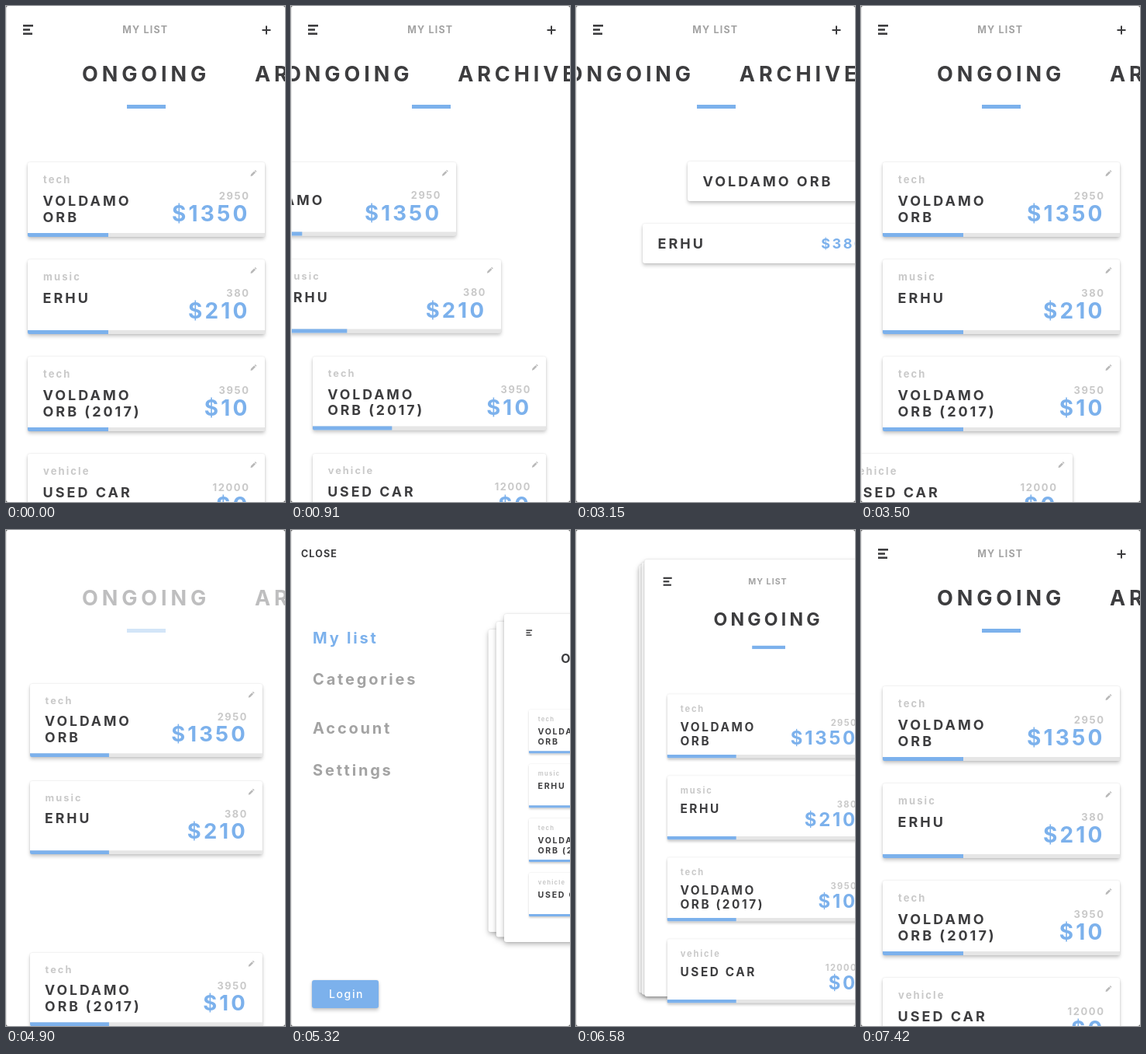
An HTML page for the animation above (7.77 s loop, 360 by 638 pixels).

```html
<!DOCTYPE html>
<html lang="en">
<head>
<meta charset="utf-8">
<title>Savings list</title>
<style>
html, body { margin: 0; width: 100%; height: 100%; overflow: hidden; background: #fff; }
svg { display: block; width: 360px; height: 638px; }
text { font-family: Inter, "Open Sans", sans-serif; white-space: pre; }
.card { fill: #fff; filter: drop-shadow(0 0 1px rgba(0,0,0,.12)) drop-shadow(0 3px 2px rgba(0,0,0,.2)); }
.sheet { fill: #fff; filter: drop-shadow(0 0 1px rgba(0,0,0,.12)) drop-shadow(0 3px 3px rgba(0,0,0,.25)); }
</style>
</head>
<body>
<svg id="stage" viewBox="0 0 360 638"></svg>
<script>
const LOOP = 7770, STEP = 70;
const BLUE = '#7cb1ec', DARK = '#3d3d3f', GREY = '#a3a3a3', PALE = '#c9c9c9';
const stage = document.getElementById('stage');

function el(parent, tag, attrs = {}) {
  const node = document.createElementNS('http://www.w3.org/2000/svg', tag);
  set(node, attrs);
  return parent.appendChild(node);
}

function set(node, attrs) {
  for (const key in attrs) node.setAttribute(key, attrs[key]);
}

function rect(parent, x, y, width, height, fill, rx = 0) {
  return el(parent, 'rect', { x, y, width, height, fill, rx });
}

function label(parent, str, x, y, size, fill, spacing, right = false, weight = 700) {
  const node = el(parent, 'text', {
    x: right ? x + spacing : x, y, fill,
    'font-size': size, 'font-weight': weight, 'letter-spacing': spacing,
    'text-anchor': right ? 'end' : 'start'
  });
  node.textContent = str;
  return node;
}

function cardBase(parent, height) {
  const g = el(parent, 'g');
  el(g, 'rect', { class: 'card', width: 306, height, rx: 3 });
  return g;
}

function goalCard(parent, [kind, lines, total, left]) {
  const g = cardBase(parent, 96);
  el(g, 'path', { d: 'M0 91H306V94Q306 96 304 96H2Q0 96 0 94Z', fill: '#e6e6e6' });
  el(g, 'path', { d: 'M0 91H104V96H2Q0 96 0 94Z', fill: BLUE });
  label(g, kind, 20, 26.5, 13, PALE, 2.1);
  lines.forEach((line, i) => label(g, line, 19.5, 55.5 + 21 * i, 18, DARK, 3));
  label(g, total, 285, 47.5, 13, PALE, 1.6, true);
  label(g, left, 283.5, 76, 28, BLUE, 3.2, true);
  el(g, 'path', {
    d: 'M287.5 18l.6-2.4 4.1-4.1 1.8 1.8-4.1 4.1zM292.8 10.9l.9-.9 1.8 1.8-.9.9z',
    fill: '#b8b8b8'
  });
  return g;
}

function doneCard(parent, [name, price]) {
  const g = cardBase(parent, 51);
  label(g, name, 19.5, 32, 18, DARK, 3);
  label(g, price, 285, 32, 18, BLUE, 2.5, true);
  return g;
}

// Menu, behind the page
rect(stage, 0, 0, 360, 638, '#fff');
const menu = el(stage, 'g');
[['My list', 146, BLUE], ['Categories', 199, GREY], ['Account', 262, GREY], ['Settings', 316, GREY]]
  .forEach(([str, y, fill]) => label(menu, str, 46, y, 20, fill, 2.8));
const login = rect(menu, 45, 579, 86, 36, BLUE, 3);
login.setAttribute('class', 'card');
login.style.fill = BLUE;
label(menu, 'Login', 67, 602, 14, '#fff', 1.6, false, 500);
const close = label(stage, 'CLOSE', 22, 34.5, 12.5, DARK, 1.1);

// Page and the sheets under it
const sheets = [2, 1, 0].map(depth => ({ depth, node: el(stage, 'rect', { class: 'sheet', rx: 3 }) }));
const page = el(stage, 'g');
const head = el(page, 'g');
rect(head, 22, 24, 13, 2.6, DARK);
rect(head, 22, 29.2, 9, 2.6, DARK);
rect(head, 22, 34.4, 12, 2.6, DARK);
rect(head, 330.5, 30, 11, 2, DARK);
rect(head, 335, 25.5, 2, 11, DARK);
label(head, 'MY LIST', 150.2, 34.5, 12.5, GREY, 1.2);

const tabs = el(page, 'g');
const names = el(tabs, 'g');
label(names, 'ONGOING', 98, 97, 27, DARK, 4.9);
label(names, 'ARCHIVE', 321, 97, 27, DARK, 4.9);
rect(tabs, 156, 127, 50, 5, BLUE);

const goals = [
  ['tech', ['VOLDAMO', 'ORB'], '2950', '$1350'],
  ['music', ['ERHU'], '380', '$210'],
  ['tech', ['VOLDAMO', 'ORB (2017)'], '3950', '$10'],
  ['vehicle', ['USED CAR'], '12000', '$0']
].map(data => goalCard(page, data));
const done = [['VOLDAMO ORB', '$2950'], ['ERHU', '$380']].map(data => doneCard(page, data));

// Device edge
rect(stage, 0, 0, 1, 638, '#e4e4e4');
el(stage, 'path', {
  d: 'M0 0H360V638H0ZM3 0Q0 0 0 3V635Q0 638 3 638H357Q360 638 360 635V3Q360 0 357 0Z',
  'fill-rule': 'evenodd', fill: '#555'
});

const clamp = (x, lo = 0, hi = 1) => Math.min(hi, Math.max(lo, x));
const smooth = x => x * x * (3 - 2 * x);
const easeOut = x => 1 - (1 - x) ** 2;
const place = (node, x, y, s = 1) => node.setAttribute('transform', `translate(${x} ${y}) scale(${s})`);
const show = (node, on) => { node.style.display = on ? '' : 'none'; };

function pose(t) {
  const since = ms => Math.floor(t / STEP) - ms / STEP;
  const p = {
    tab: 0, head: 1, tabs: 1, mini: 0, slide: 0, menu: -400, close: -200,
    goals: goals.map((_, i) => ({ x: 28, y: 201 + 125 * i, s: 1 })),
    done: done.map(() => 400)
  };
  if (t >= 910 && t < 3150) {                    // swipe to archive
    const n = since(840);
    p.tab = n > 10 ? 216 : 216 * (1 - .51 ** n);
    p.goals.forEach((c, i) => {
      c.x -= 116 * Math.max(0, n - i / 2);
      c.s = Math.max(.94, 1 - .016 * n);
    });
    p.done = done.map((_, i) => 400 * (1 - easeOut(clamp((n - 3 - i) / 8))));
  } else if (t >= 3150 && t < 4900) {            // swipe back
    const n = since(3080);
    p.tab = n > 5 ? 0 : 216 * .51 ** n;
    p.goals.forEach((c, i) => { c.x += Math.min(0, 116 * (n - 6) - 61 * (i - 2)); });
    p.done = done.map((_, i) => 116 * Math.max(0, n - i / 2));
  } else if (t >= 4900 && t < 6230) {            // open the menu
    const n = since(4830);
    p.menu = -220 * (1 - easeOut(clamp((n - 2) / 7)));
    p.close = p.menu / 2;
    if (n < 5) {
      p.head = 0;
      p.tabs = n > 1 ? 0 : .33;
      p.goals.forEach((c, i) => {
        const k = n + i - 2;
        c.x = 31;
        c.y += k > 0 ? 93 * k ** 1.6 : -3;
        c.s = .98;
      });
    } else {
      p.mini = 1;
      p.slide = 150 * (1 - easeOut(clamp((n - 4) / 5)));
    }
  } else if (t >= 6230 && t < 6860) {            // close the menu
    const x = since(6160) / 10;
    p.mini = 1 - smooth(x);
    p.menu = -880 * x;
    p.close = -420 * x;
  }
  return p;
}

function render(t) {
  const p = pose(t), v = p.mini;
  place(menu, p.menu, 0);
  place(close, p.close, 0);
  sheets.forEach(({ depth, node }) => {
    show(node, v > 0);
    set(node, {
      x: (251 - 10.2 * depth) * v + p.slide,
      y: (108 + 10 * depth) * v,
      width: 360 - 122 * v,
      height: 638 - (216 + 16.5 * depth) * v
    });
  });
  place(page, 266.5 * v + p.slide, 114.2 * v, 1 - .4115 * v);
  head.setAttribute('opacity', p.head);
  tabs.setAttribute('opacity', p.tabs);
  place(names, -p.tab, 0);
  p.goals.forEach((c, i) => {
    show(goals[i], c.x > -340);
    place(goals[i], c.x, c.y - v * (3 + 6.2 * i), c.s);
  });
  p.done.forEach((x, i) => {
    show(done[i], x < 340);
    place(done[i], 28 + x, 200 + 80 * i);
  });
}

const start = performance.now();
function tick() {
  render((performance.now() - start) % LOOP);
  requestAnimationFrame(tick);
}
render(0);
requestAnimationFrame(tick);
</script>
</body>
</html>
```
